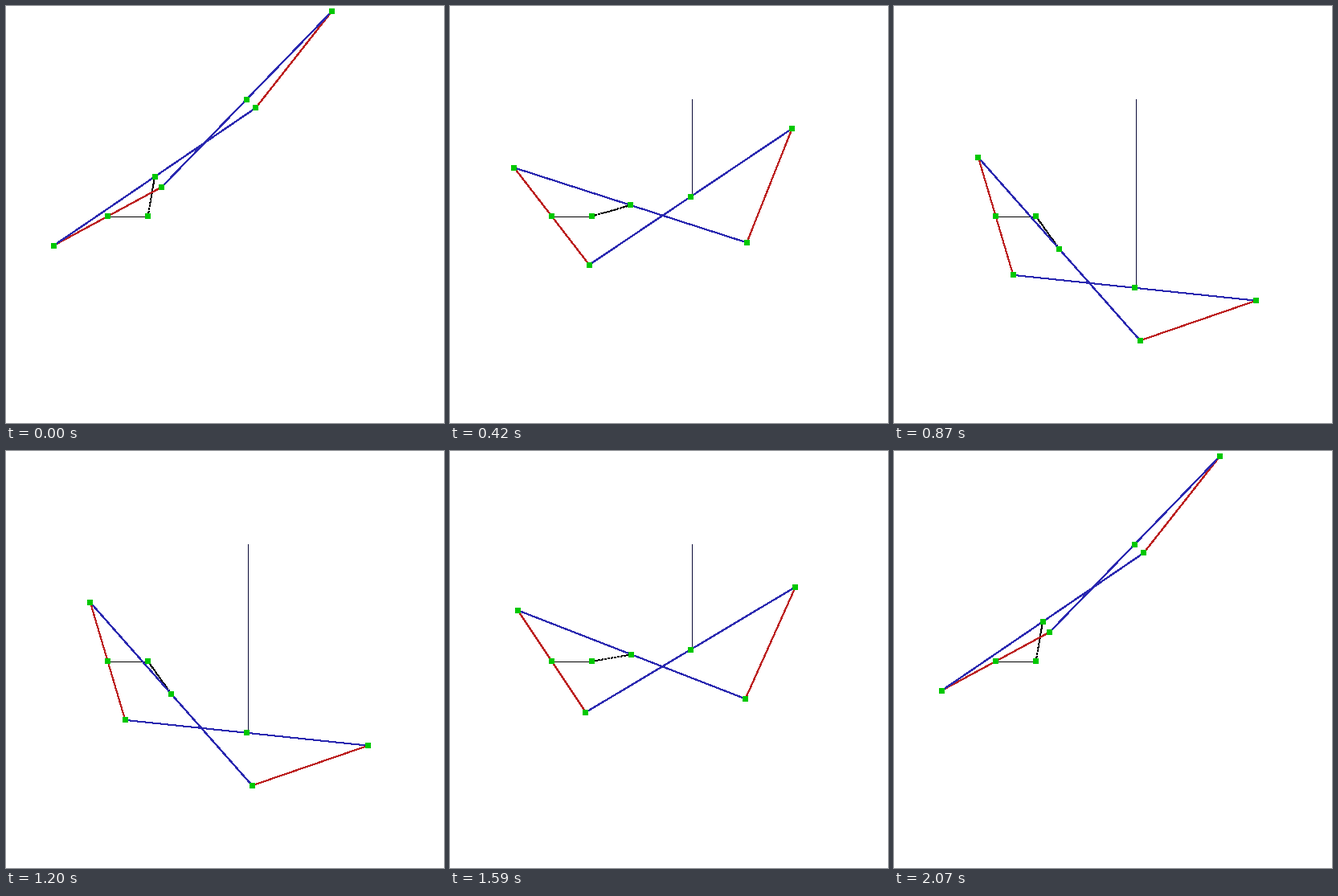
A matplotlib script for the animation above (2100 ms loop, 545 by 519 pixels).

```python
import numpy as np
import matplotlib.pyplot as plt
from matplotlib.animation import FuncAnimation
from matplotlib.collections import PolyCollection

W, H, DPI = 545, 519, 100
FRAMES, STEP_MS = 70, 30
HALF = FRAMES // 2
STEPS, SWING = 50, 80.2        # crank positions per sweep, degrees either side

A = np.array([126.6, 261.7])   # fixed centre of the short bar
B = A + [50, 0]                # crank pivot
CRANK = 50
SHORT, LONG = 76.3, 152.0      # half lengths of the bars

RED, BLUE, GREEN = "#bc2020", "#2a28b0", "#00c800"
SQUARE = 3.5 * np.array([[-1, -1], [1, -1], [1, 1], [-1, 1]])


def crank_angle(i):
    """Sweep from top to bottom and back in whole steps."""
    if i < HALF:
        n = STEPS * i // (HALF - 1)
    else:
        u = (i - HALF) / (HALF - 1)
        n = STEPS - round(STEPS * u + 1.4 * np.sin(np.pi * u))
    return np.radians(SWING * (1 - 2 * n / STEPS))


def linkage(angle):
    """Joints of the crossed four-bar inversor for one crank angle."""
    C = B + CRANK * np.array([np.cos(angle), -np.sin(angle)])
    d = np.hypot(*(C - A))
    u = (C - A) / d
    normal = np.array([u[1], -u[0]])
    along = (SHORT**2 - LONG**2 + d**2) / (2 * d)
    P = A + along * u + np.sqrt(SHORT**2 - along**2) * normal
    D = A + u * (LONG**2 - SHORT**2) / d
    Q = 2 * A - P
    R = 2 * C - P
    S = 2 * D - Q
    return C, D, P, Q, R, S


fig = plt.figure(figsize=(W / DPI, H / DPI), dpi=DPI, facecolor="white")
ax = fig.add_axes([0, 0, 1, 1])
ax.set_xlim(0, W)
ax.set_ylim(H, 0)
ax.axis("off")


def bar(color, **kw):
    line, = ax.plot([], [], color=color, lw=72 / DPI, antialiased=False,
                    solid_capstyle="butt", **kw)
    return line


trace = bar("#0a0a38")
ground = bar("black")
crank = bar("black", dashes=(2.5, 2), dash_capstyle="butt")
reds = [bar(RED), bar(RED)]
blues = [bar(BLUE), bar(BLUE)]
joints = PolyCollection([], facecolors=GREEN, linewidths=0,
                        antialiaseds=False, zorder=5)
ax.add_collection(joints, autolim=False)

TOP = linkage(np.radians(SWING))[1]


def join(line, p, q):
    line.set_data([p[0], q[0]], [p[1], q[1]])


def draw(i):
    C, D, P, Q, R, S = linkage(crank_angle(i))
    join(trace, (300.5, TOP[1]), (300.5, D[1]))
    join(ground, A, B)
    join(crank, B, C)
    join(reds[0], P, Q)
    join(reds[1], R, S)
    join(blues[0], P, R)
    join(blues[1], Q, S)
    centres = np.floor([A, B, C, D, P, Q, R, S]) + 0.5
    joints.set_verts([c + SQUARE for c in centres])
    return [trace, ground, crank, *reds, *blues, joints]


anim = FuncAnimation(fig, draw, frames=FRAMES, interval=STEP_MS,
                     repeat=True, repeat_delay=0, blit=False)
plt.show()
```
